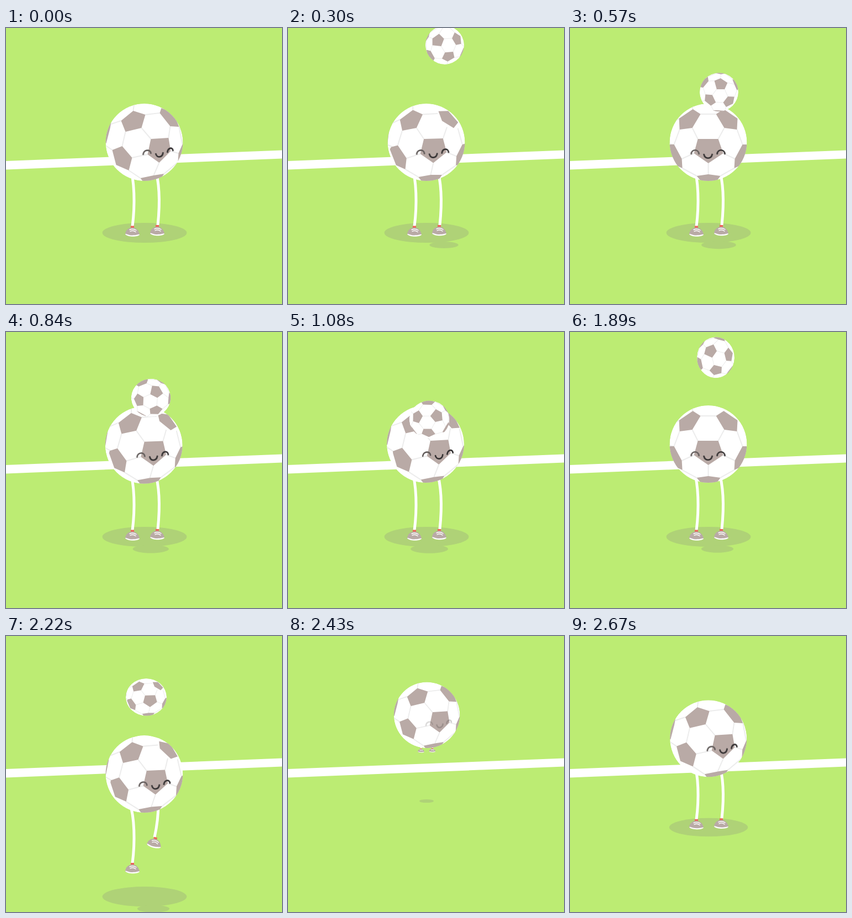
An HTML page without scripts for the animation above (2.7 s loop, 500 by 500 pixels).

```html
<!DOCTYPE html>
<html lang="en">
<head>
<meta charset="utf-8">
<title>Juggling football</title>
<style>
html, body { margin: 0; width: 100%; height: 100%; overflow: hidden; background: #bcec73; }
svg { display: block; width: 100vw; height: 100vh; }
svg * { animation: 2.7s linear infinite; }

/* Easings used below: quadratic fall (.333, 0, .667, .333) and rise (.333, .667, .667, 1),
   cubic drop (.333, 0, .667, 0) and kick (.215, .61, .355, 1) */

/* Each ball drawing has a front and a side view */
.patches {
  --front: path("M-19-6L18-6L27 20L0 38L-26 20ZM-53-43L-28-60L-14-51L-29-26L-52-23ZM14-51L28-60L53-43L52-23L29-26ZM-69 4L-62 4L-48 30L-47 47L-58 42L-74 8ZM69 4L62 4L48 30L47 47L58 42L74 8ZM-21 61L0 58L22 61L14 72L-12 72ZM-74-30L-72-20L-71 0L-80 0Z");
  --side: path("M12-6L44-8L48 16L27 37L6 22ZM-42-39L-20-57L2-50L-5-26L-34-19ZM31-62L53-53L63-28L47-29L28-53ZM-58 14L-40 7L-22 28L-28 51L-51 41L-57 18ZM74 0L69 4L62 20L61 36L70 40L74 8ZM-7 65L17 60L36 57L26 72L0 74ZM-60-36L-62-25L-69 2L-80-10Z");
  fill: #b9aaa6;
}
.seams {
  --front: path("M-19-6L-29-26M18-6L29-26M-26 20L-48 30M27 20L48 30M0 38L0 58M-14-51L14-51M-52-23L-62 4M52-23L62 4M-47 47L-21 61M47 47L22 61M-28-60L-30-72M-53-43L-72-32M-62 4L-71 3");
  --side: path("M12-6L-5-26M44-8L47-29M6 22L-22 28M48 16L62 20M27 37L17 60M2-50L28-53M-34-19L-40 7M63-28L69 4M-28 51L-7 65M61 36L36 57M-20-57L-18-72M-42-39L-60-33M-58 14L-70 6");
  fill: none; stroke: #ececec; stroke-width: 2;
}
.eye {
  --front: path("M-31 21C-30 12-18 12-17 21");
  --side: path("M-2 22C-1 13 11 12 12 20");
  stroke: #625c5b;
}
.smile {
  --front: path("M16 21C17 12 29 12 30 21M-8 22C-6 31 5 31 7 22");
  --side: path("M42 18C43 10 51 8 52 15M21 21C23 29 33 28 34 19");
  stroke: #353233;
}
.patches, .seams, .eye, .smile { d: var(--side); }
.hero path { animation-name: turn; }
@keyframes turn {
  0%, 36.7%, 86.3%, 100% { d: var(--side); }
  21.1%, 70% { d: var(--front); }
}
.spin path { animation-name: peek; }
@keyframes peek {
  0%, 70%, 88.9%, 100% { d: var(--side); }
  76% { d: var(--front); }
}

.hero { animation-name: hero; }
@keyframes hero {
  0%, 21.1% { translate: 250.5px 207px; scale: 1; }
  40% { translate: 249px 203px; }
  54.4% { translate: 248px 195px; }
  70%, 77% { translate: 250.5px 203px; animation-timing-function: cubic-bezier(.333, 0, .667, 0); }
  88.88% { translate: 250px 745px; scale: 1; }
  88.89% { translate: 252px 150px; scale: .75; animation-timing-function: cubic-bezier(.333, .667, .667, 1); }
  93.3% { translate: 251px 135px; scale: .98; animation-timing-function: cubic-bezier(.333, 0, .667, .333); }
  100% { translate: 250.5px 207px; scale: 1; }
}
.face { fill: none; stroke-width: 2.7; stroke-linecap: round; animation-name: face; }
@keyframes face {
  0%, 88.88%, 93.3%, 100% { opacity: 1; }
  88.89% { opacity: 0; }
}

.legs { transform-origin: 251px 207px; animation-name: legs; }
@keyframes legs {
  0%, 77% { translate: 0 0; scale: 1; animation-timing-function: cubic-bezier(.333, 0, .667, 0); }
  88.88% { translate: 0 605px; scale: 1; }
  88.89% { translate: 0 -57px; scale: 0; animation-timing-function: cubic-bezier(.333, .667, .667, 1); }
  93.3% { translate: 0 -72px; scale: 1 .88; animation-timing-function: cubic-bezier(.333, 0, .667, .333); }
  100% { translate: 0 0; scale: 1; }
}
.leg { fill: none; stroke: #fff; stroke-width: 5; }
.kicker {
  --rest: path("M269 250C277 275 280 310 275 357");
  --kick: path("M270 250C285 266 288 300 286 338");
  --step: path("M276 250C276 275 274 290 269 312");
  d: var(--rest); animation-name: leg;
}
.sole {
  --rest: path("M-13 5C-10 10 9 11 13 6C13 4 9 7 0 7C-8 7-12 3-13 5Z");
  --kick: path("M-13 5C-10 11 9 12 13 4C12-1 7-4 1-4C-7-4-11 0-13 5Z");
  --step: var(--rest);
  d: var(--rest); fill: #fff;
}
.foot .sole { animation-name: leg; }
@keyframes leg {
  0%, 47%, 62%, 77%, 88.89%, 100% { d: var(--rest); }
  54.4%, 55.5% { d: var(--kick); }
  82.2%, 88.88% { d: var(--step); }
}
.foot { animation-name: foot; }
@keyframes foot {
  0%, 47%, 62%, 77%, 88.89%, 100% { translate: 274px 367px; rotate: 0deg; }
  54.4%, 55.5% { translate: 288px 348px; rotate: -4deg; }
  82.2%, 88.88% { translate: 269px 322px; rotate: 12deg; }
}

.shadow { fill: #afd277; animation-name: ground; transform-origin: 251px 371px; }
@keyframes ground {
  0%, 77% { translate: 0 0; scale: 1; }
  80% { translate: 0 48px; }
  82.2% { translate: 0 99.5px; }
  88.88% { translate: 0 280px; scale: 1; }
  88.89% { translate: 0 -72px; scale: 0; }
  93.3% { translate: 0 -72px; scale: .65; animation-timing-function: cubic-bezier(.333, 0, .667, .333); }
  98.9% { translate: 0 -25px; scale: .93; }
  100% { translate: 0 0; scale: 1; }
}
.spot { animation-name: spot; }
@keyframes spot {
  0%, 4% { translate: 290px 393px; scale: 0; }
  10% { translate: 284px 393px; scale: .8; }
  21.1% { translate: 269.5px 393px; scale: .98; }
  40% { translate: 256px 393px; scale: 1.06; }
  54.4% { translate: 289px 392px; scale: 1.22; animation-timing-function: cubic-bezier(.215, .61, .355, 1); }
  70%, 88.88% { translate: 267px 393px; scale: .91; }
  88.89%, 100% { translate: 290px 393px; scale: 0; }
}

.across { animation-name: across; }
@keyframes across {
  0%, 4% { translate: 294px 0; }
  21.1% { translate: 270px 0; }
  40% { translate: 256px 0; }
  54.4% { translate: 294px 0; animation-timing-function: cubic-bezier(.215, .61, .355, 1); }
  70% { translate: 264px 0; }
  82.2% { translate: 254px 0; }
  88.89%, 100% { translate: 252px 0; }
}
.bounce { animation-name: bounce; }
@keyframes bounce {
  0%, 4% { translate: 0 -45px; animation-timing-function: cubic-bezier(.333, 0, .667, .333); }
  15.6% { translate: 0 155px; animation-timing-function: cubic-bezier(.333, .667, .667, 1); }
  24.4% { translate: 0 110px; animation-timing-function: cubic-bezier(.333, 0, .667, .333); }
  40% { translate: 0 159px; animation-timing-function: cubic-bezier(.333, .667, .667, 1); }
  45% { translate: 0 122px; animation-timing-function: cubic-bezier(.333, 0, .667, .333); }
  54.4% { translate: 0 293px; animation-timing-function: cubic-bezier(.215, .61, .355, 1); }
  72.2% { translate: 0 45px; animation-timing-function: cubic-bezier(.333, 0, .667, .333); }
  82.2% { translate: 0 110px; animation-timing-function: cubic-bezier(.333, .667, .667, 1); }
  88.88% { translate: 0 150px; }
  88.89%, 100% { translate: 0 -200px; }
}
.squash { animation-name: squash; }
@keyframes squash {
  0%, 21.1% { scale: .5; }
  40% { scale: .52 .485; }
  46% { scale: .49 .51; }
  54.4% { scale: .54 .47; }
  57%, 70% { scale: .485 .53; }
  82.2% { scale: .527 .48; }
  88.89%, 100% { scale: .75; }
}
.spin { animation-name: spin; }
@keyframes spin {
  0%, 4% { rotate: 140deg; }
  21.1% { rotate: 258deg; }
  40% { rotate: 310deg; }
  54.4% { rotate: 400deg; }
  70% { rotate: 565deg; }
  82.2%, 100% { rotate: 720deg; }
}
</style>
</head>
<body>
<svg viewBox="0 0 500 500">
  <defs>
    <clipPath id="round"><circle r="70"/></clipPath>
    <g id="shoe">
      <path d="M-3-10H3V-4H-3Z" fill="#ee6259"/>
      <path d="M-13 6C-13-2-7-7 0-7C7-7 12-1 13 6C8 9-8 9-13 6Z" fill="#b9aaa6"/>
      <path d="M-5-3Q1-6 7-2M-4 0Q1-3 6 1" fill="none" stroke="#fff" stroke-width="1.4" stroke-linecap="round"/>
    </g>
  </defs>

  <rect width="500" height="500" fill="#bcec73"/>
  <path d="M0 241L500 221.5V236.5L0 256.5Z" fill="#fff"/>

  <g class="shadow">
    <ellipse cx="251" cy="371" rx="76.5" ry="18"/>
    <ellipse class="spot" rx="32" ry="7.3"/>
  </g>

  <g class="legs">
    <path class="leg" d="M224 250C233 275 234 320 229 359"/>
    <path class="leg kicker"/>
    <g transform="translate(229 368.5)"><use href="#shoe"/><path class="sole"/></g>
    <g class="foot"><use href="#shoe"/><path class="sole"/></g>
  </g>

  <g class="hero">
    <g clip-path="url(#round)">
      <circle r="70" fill="#fff"/>
      <path class="seams"/>
      <path class="patches"/>
    </g>
    <g class="face"><path class="eye"/><path class="smile"/></g>
  </g>

  <g class="across"><g class="bounce"><g class="squash"><g class="spin">
    <g clip-path="url(#round)">
      <circle r="70" fill="#fff"/>
      <path class="seams"/>
      <path class="patches"/>
    </g>
  </g></g></g></g>
</svg>
</body>
</html>
```
